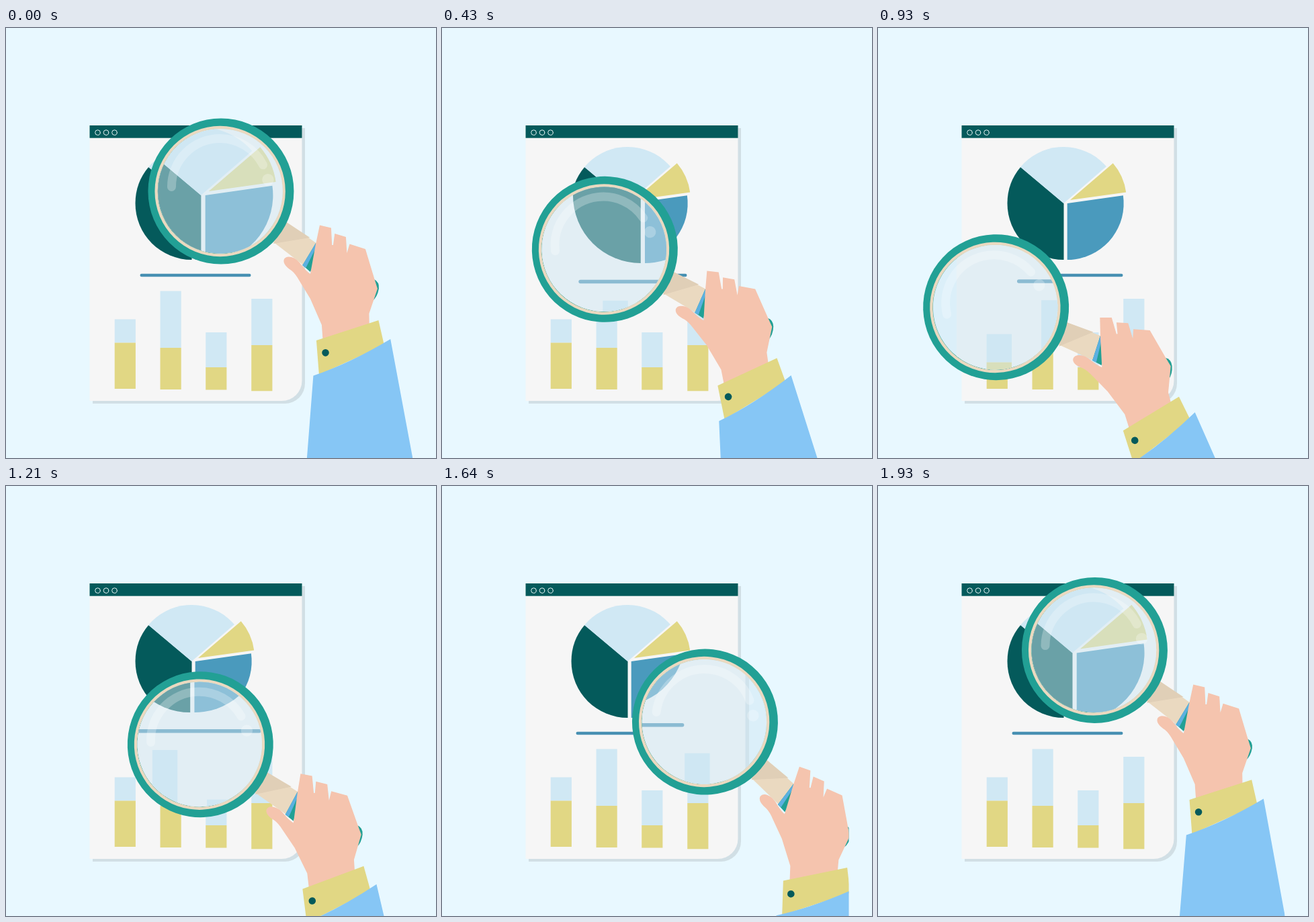
Recreate the animation shown at these times as an HTML page with a canvas. Size 640 px wide and 640 px high, loop 2 s.

```html
<!DOCTYPE html>
<html lang="en">
<head>
<meta charset="utf-8">
<title>Report under a magnifying glass</title>
<style>
  html, body { margin: 0; width: 100%; height: 100%; overflow: hidden; background: #e8f8ff; }
  canvas { display: block; }
</style>
</head>
<body>
<canvas id="stage" width="640" height="640"></canvas>
<script>
const ctx = document.getElementById('stage').getContext('2d');

const LOOP = 2000, STEPS = 28, ZOOM = 1.2;
const BG = '#e8f8ff', DARK = '#045a5b', TEAL = '#22a095', CREAM = '#ead9c0',
      PALE = '#d0e8f4', BLUE = '#4a9abd', YELLOW = '#e1d784', SKIN = '#f5c4ae';

// Hand pivot and angle, plus the offset of the magnified view
const TOP   = { x: 513.6, y: 435.3, a: 0.09, bx: -41.5, by: -64.3 };
const LEFT  = { x: 402,   y: 558.6, a: -14,  bx: -30.7, by: -63.8 };
const RIGHT = { x: 566.5, y: 577,   a: 7,    bx: -80.5, by: -88 };
const LEGS = [
  { from: TOP,   to: LEFT,  start: 0,     end: 21.9,  until: 21.3 },
  { from: LEFT,  to: RIGHT, start: 21.1,  end: 37.98, until: 38.1 },
  { from: RIGHT, to: TOP,   start: 38.24, end: 47.81, until: Infinity }
];
const PIVOT = { x: 513, y: 436 };

function poseAt(ms) {
  const step = Math.floor((ms % LOOP + 5) / (LOOP / STEPS)) % STEPS;
  const k = Math.round(step * 12 / 7) + 1;
  const leg = LEGS.find(l => k < l.until);
  const u = Math.min(1, Math.max(0, (k - leg.start) / (leg.end - leg.start)));
  const e = u * u * (3 - 2 * u);
  const pose = {};
  for (const key in leg.from) pose[key] = leg.from[key] + (leg.to[key] - leg.from[key]) * e;
  return pose;
}

const rad = deg => deg * Math.PI / 180;

function rect(x, y, x2, y2, color) {
  ctx.fillStyle = color;
  ctx.fillRect(x, y, x2 - x, y2 - y);
}

function disc(x, y, r, color) {
  ctx.fillStyle = color;
  ctx.beginPath();
  ctx.arc(x, y, r, 0, 7);
  ctx.fill();
}

function wedge(x, y, from, to, color) {
  ctx.fillStyle = color;
  ctx.beginPath();
  ctx.moveTo(x, y);
  ctx.arc(x, y, 84, rad(from), rad(to));
  ctx.fill();
}

function shape(d, color) {
  ctx.fillStyle = color;
  ctx.fill(new Path2D(d));
}

function sheet(x, y, color) {
  ctx.fillStyle = color;
  ctx.beginPath();
  ctx.roundRect(x, y, 316, 410, [0, 0, 30, 0]);
  ctx.fill();
}

function bar(x, top, mid, bottom) {
  rect(x, top, x + 31.2, mid, PALE);
  rect(x, mid, x + 31.2, bottom, YELLOW);
}

function page() {
  rect(-50, -50, 750, 750, BG);
  sheet(129, 149, '#d1dfe5');
  sheet(124.5, 145, '#f6f6f6');
  rect(124.5, 145, 440.5, 163.7, DARK);
  ctx.strokeStyle = '#e8f4f4';
  ctx.lineWidth = 1;
  for (const x of [136.5, 149, 161.5]) {
    ctx.beginPath();
    ctx.arc(x, 155.6, 3.8, 0, 7);
    ctx.stroke();
  }

  wedge(276.5, 261, 90, 220, DARK);
  wedge(276.3, 261, 220, 319.2, PALE);
  wedge(286, 256, -40.6, -7.9, YELLOW);
  wedge(281.7, 261, -8.1, 90, BLUE);

  ctx.strokeStyle = '#4790b2';
  ctx.lineWidth = 4.6;
  ctx.lineCap = 'round';
  ctx.beginPath();
  ctx.moveTo(201.8, 368);
  ctx.lineTo(362.2, 368);
  ctx.stroke();

  bar(161.7, 433.5, 468.5, 537);
  bar(229.5, 391.5, 476, 538);
  bar(297.2, 453, 505, 538.5);
  bar(365.2, 403, 472, 540.3);
}

function handle() {
  shape('M416 288 L463 321 L444 354 L396 317 Z', CREAM);
  shape('M416 288 L452.5 312 L398 321 Z', '#e0cfb7');
  shape('M461 320.5 L470 324 L453 363 L441.5 353 Z', TEAL);
  shape('M461 320.5 L464 322 L446.5 356.8 L441.5 353 Z', '#5cb0e0');
  shape('M548 374 Q556 378 555 388 Q553 400 545 407 Z', TEAL);
}

function lens(pose) {
  disc(320, 243, 108.5, TEAL);
  disc(318.7, 243, 97.2, CREAM);
  disc(318.7, 243, 92.9, TEAL);

  ctx.save();
  ctx.beginPath();
  ctx.arc(319, 242.8, 92.7, 0, 7);
  ctx.clip();
  ctx.setTransform(ZOOM, 0, 0, ZOOM, pose.bx, pose.by);
  page();
  ctx.restore();
  disc(319, 242.8, 92.7, 'rgba(208,232,244,.5)');

  const shine = 'rgba(255,255,255,.25)';
  ctx.strokeStyle = shine;
  ctx.lineWidth = 13;
  ctx.lineCap = 'round';
  ctx.beginPath();
  ctx.arc(318.5, 236.5, 72, rad(180), rad(333));
  ctx.stroke();
  disc(390, 225.7, 8.7, shine);
}

function arm() {
  shape('M414 344 Q417 339 425 341 Q433 343 441 354 Q447 362 453 366 L461 322 L467 293.5 ' +
    'L484 297.5 L485.3 323 L487 323 L489.3 306 L506 311 L507.5 335 L511.5 321.5 L535 329 ' +
    'L548 372 L553 388 L540.5 425 L541 450 L472 470 L470 442 L453 403 L436 375 ' +
    'Q431 366 425 361 Q411 352 414 344 Z', SKIN);
  shape('M462 465 L554.5 435 L563 472 L466 516 Z', YELLOW);
  disc(475.6, 483.3, 5.3, DARK);
  shape('M457.5 517.5 Q512 499 572.3 463 L622 729 L441 730 Z', '#86c6f5');
}

function draw(ms) {
  const pose = poseAt(ms);
  page();
  ctx.save();
  ctx.beginPath();
  ctx.rect(0, 0, 605.5, 640);
  ctx.clip();
  ctx.translate(pose.x, pose.y);
  ctx.rotate(rad(pose.a));
  ctx.translate(-PIVOT.x, -PIVOT.y);
  handle();
  lens(pose);
  arm();
  ctx.restore();
}

const begin = performance.now();
function tick() {
  draw(Math.max(0, performance.now() - begin));
  requestAnimationFrame(tick);
}
tick();
</script>
</body>
</html>
```
